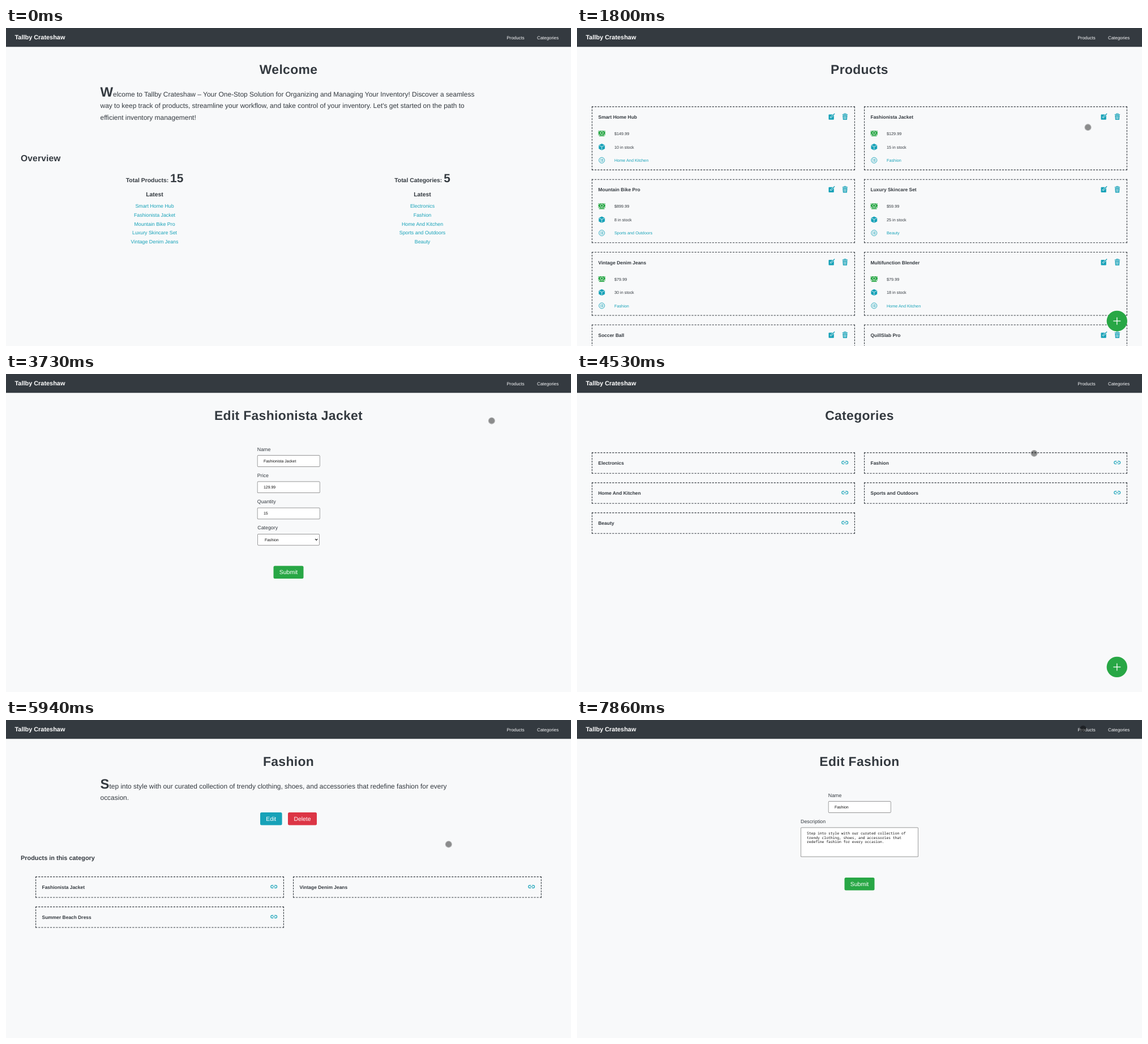
An HTML page with a canvas for the animation above (8 s loop, 998x561 px).

```html
<!DOCTYPE html>
<html lang="en">
<head>
<meta charset="utf-8">
<title>Inventory demo</title>
<style>
html, body { margin: 0; width: 100%; height: 100%; overflow: hidden; background: #f8f9fa; }
canvas { display: block; width: 998px; height: 561px; }
</style>
</head>
<body>
<canvas id="stage"></canvas>
<script>
const W = 998, H = 561, LOOP = 8000, FPS = 15;
const BG = '#f8f9fa', DARK = '#343a40', TEAL = '#17a2b8', GREEN = '#28a745', RED = '#dc3545';
const SANS = '"Liberation Sans", Arial, sans-serif';
const MONO = '"Noto Sans Mono", "DejaVu Sans Mono", monospace';
const BRAND = 'Tallby Crateshaw';
const LEFT = 26, MID = 507;

const canvas = document.getElementById('stage');
const ctx = canvas.getContext('2d');
const dpr = window.devicePixelRatio || 1;
canvas.width = W * dpr;
canvas.height = H * dpr;

// Text and shape helpers

function text(str, x, y, size, { color = DARK, bold = false, align = 'left', spacing = 0, font = SANS } = {}) {
  ctx.font = `${bold ? 'bold ' : ''}${size}px ${font}`;
  ctx.letterSpacing = spacing + 'px';
  ctx.textAlign = align;
  ctx.fillStyle = color;
  ctx.fillText(str, x, y);
  return ctx.measureText(str).width;
}

function fillBox(x, y, w, h, color, radius = 0) {
  ctx.fillStyle = color;
  ctx.beginPath();
  ctx.roundRect(x, y, w, h, radius);
  ctx.fill();
}

function disc(x, y, r, color) {
  ctx.fillStyle = color;
  ctx.beginPath();
  ctx.arc(x, y, r, 0, Math.PI * 2);
  ctx.fill();
}

function ring(x, y, r, color, width) {
  ctx.strokeStyle = color;
  ctx.lineWidth = width;
  ctx.beginPath();
  ctx.arc(x, y, r, 0, Math.PI * 2);
  ctx.stroke();
}

function line(color, width, ...pts) {
  ctx.strokeStyle = color;
  ctx.lineWidth = width;
  ctx.beginPath();
  for (let i = 0; i < pts.length; i += 2) ctx.lineTo(pts[i], pts[i + 1]);
  ctx.stroke();
}

function poly(color, ...pts) {
  ctx.fillStyle = color;
  ctx.beginPath();
  for (let i = 0; i < pts.length; i += 2) ctx.lineTo(pts[i], pts[i + 1]);
  ctx.fill();
}

// The gap is adjusted so that every side ends on a full dash
function dashedSide(x1, y1, x2, y2) {
  const len = Math.hypot(x2 - x1, y2 - y1), dash = 3.12, gap = 2.08;
  const gaps = Math.round((len - dash) / (dash + gap));
  ctx.setLineDash([dash, (len - dash * (gaps + 1)) / gaps]);
  line(DARK, 1.1, x1, y1, x2, y2);
  ctx.setLineDash([]);
}

function dashedBox(x, y, w, h) {
  const e = 0.6, r = x + w, b = y + h;
  dashedSide(x, y + e, r, y + e);
  dashedSide(x, b - e, r, b - e);
  dashedSide(x + e, y, x + e, b);
  dashedSide(r - e, y, r - e, b);
}

// Icons, each placed by its centre

function cashIcon(x, y) {
  fillBox(x - 6.2, y - 5, 12.4, 7.6, GREEN, 0.5);
  fillBox(x - 5.2, y + 3.2, 10.4, 1.6, GREEN, 0.6);
  ring(x, y - 1.2, 2.5, BG, 0.8);
  for (const dx of [-6.2, 6.2]) for (const dy of [-5, 2.6]) ring(x + dx, y + dy, 2, BG, 0.8);
}

function boxIcon(x, y) {
  poly(TEAL, x, y - 5.8, x + 5.4, y - 3.2, x + 5.4, y + 3, x, y + 5.8, x - 5.4, y + 3, x - 5.4, y - 3.2);
  line(BG, 0.8, x - 5.4, y - 3.1, x, y - 0.5, x + 5.4, y - 3.1);
  line(BG, 0.8, x, y - 0.5, x, y + 5.8);
}

function listIcon(x, y) {
  ring(x, y, 5, TEAL, 0.9);
  for (const dy of [-1.9, 0, 1.9]) {
    disc(x - 2.3, y + dy, 0.55, TEAL);
    line(TEAL, 0.8, x - 1, y + dy, x + 2.8, y + dy);
  }
}

function editIcon(x, y) {
  fillBox(x - 5, y - 4.2, 9.3, 9.3, TEAL, 1);
  line(BG, 2.6, x - 1.8, y + 1.6, x + 5.4, y - 5.6);
  line(TEAL, 1.4, x - 0.7, y + 0.5, x + 5.6, y - 5.8);
  poly(TEAL, x - 1.7, y + 1.5, x - 1.3, y, x - 0.2, y + 1.1);
}

function trashIcon(x, y) {
  fillBox(x - 4.8, y - 4.3, 9.6, 1.2, TEAL, 0.4);
  line(TEAL, 0.9, x - 1.8, y - 4, x - 1.8, y - 5.3, x + 1.8, y - 5.3, x + 1.8, y - 4);
  poly(TEAL, x - 4.1, y - 2.4, x + 4.1, y - 2.4, x + 3.5, y + 5.8, x - 3.5, y + 5.8);
  for (const dx of [-1.9, 0, 1.9]) line(BG, 0.75, x + dx, y - 1.2, x + dx * 0.85, y + 4.6);
}

function linkIcon(x, y) {
  ctx.strokeStyle = TEAL;
  ctx.lineWidth = 1.14;
  for (const side of [-1, 1]) {
    ctx.beginPath();
    ctx.moveTo(x + side, y - 2.4);
    ctx.lineTo(x + side * 3, y - 2.4);
    ctx.arc(x + side * 3, y, 2.4, -Math.PI / 2, Math.PI / 2, side < 0);
    ctx.lineTo(x + side, y + 2.4);
    ctx.stroke();
  }
  line(TEAL, 1.14, x - 2.4, y, x + 2.4, y);
}

// Page parts

function nav() {
  fillBox(0, 0, W, 33.3, DARK);
  text(BRAND, 15.5, 20.3, 10.92, { color: '#fff', bold: true });
  text('Products', 884.5, 19.6, 7.9, { color: BG });
  text('Categories', 938, 19.6, 7.9, { color: BG });
}

function tapped(x, w) {
  fillBox(x, 12, w, 10, 'rgba(30,150,180,.5)');
  ctx.strokeStyle = '#6f757b';
  ctx.lineWidth = 1;
  ctx.strokeRect(x - 0.5, 6.5, w + 0.5, 20.5);
}

function heading(str) {
  text(str, 499, 80.8, 22.88, { bold: true, align: 'center', spacing: 0.34 });
}

function intro(lines) {
  const cap = text(lines[0][0], 166.5, 120.5, 23.92, { bold: true });
  lines.forEach((s, i) => text(i ? s : s.slice(1), 166.5 + (i ? 0 : cap), 120.5 + i * 20.7, 11.96));
}

function button(str, x, y, w, color) {
  fillBox(x, y, w, 22.4, color, 2.5);
  text(str, x + w / 2, y + 14.8, 10.4, { color: '#fff', align: 'center' });
}

function addButton() {
  const x = 953.8, y = 516.9, arm = 6.5;
  disc(x, y, 18.2, GREEN);
  line('#fff', 1.3, x - arm, y, x + arm, y);
  line('#fff', 1.3, x, y - arm, x, y + arm);
}

function field(label, x, y, w, h) {
  text(label, x, y - 7.7, 8.84);
  fillBox(x, y, w, h, '#767676', 1.6);
  fillBox(x + 0.7, y + 0.7, w - 1.4, h - 1.4, '#fff', 1);
}

function input(label, value, y) {
  field(label, 443.8, y, 110.8, 20.4);
  text(value, 455, y + 12.6, 6.93, { color: '#111' });
}

function linkCard(name, x, y, w) {
  dashedBox(x, y, w, 37.6);
  text(name, x + 11.5, y + 21.7, 8.45, { bold: true });
  linkIcon(x + w - 17.8, y + 18);
}

function productCard([name, price, stock, category], x, y) {
  dashedBox(x, y, 465, 112.7);
  text(name, x + 11.5, y + 21.7, 8.45, { bold: true });
  editIcon(x + 423.5, y + 18.4);
  trashIcon(x + 447.4, y + 18);
  const ix = x + 17.8, tx = x + 40;
  cashIcon(ix, y + 48);
  boxIcon(ix, y + 71.6);
  listIcon(ix, y + 95);
  text('$' + price, tx, y + 50.7, 7.28);
  text(stock + ' in stock', tx, y + 74.2, 7.28);
  text(category, tx, y + 97.6, 7.28, { color: TEAL });
}

function summary(label, count, names, cx) {
  const bold = true;
  ctx.letterSpacing = '0px';
  ctx.font = `bold 10.4px ${SANS}`;
  const w = ctx.measureText(label + ' ').width;
  const x = cx - (w + String(count).length * 11.57) / 2;
  text(label, x, 272.2, 10.4, { bold });
  text(String(count), x + w, 272.2, 20.8, { bold });
  text('Latest', cx, 296.8, 10.4, { bold, align: 'center' });
  names.forEach((s, i) => text(s, cx, 317.4 + i * 15.6, 8.84, { color: TEAL, align: 'center' }));
}

// Data

const CATEGORIES = ['Electronics', 'Fashion', 'Home And Kitchen', 'Sports and Outdoors', 'Beauty'];
const [TECH, FASHION, HOME, SPORT, BEAUTY] = CATEGORIES;
const PRODUCTS = [
  ['Smart Home Hub', '149.99', 10, HOME],
  ['Fashionista Jacket', '129.99', 15, FASHION],
  ['Mountain Bike Pro', '899.99', 8, SPORT],
  ['Luxury Skincare Set', '59.99', 25, BEAUTY],
  ['Vintage Denim Jeans', '79.99', 30, FASHION],
  ['Multifunction Blender', '79.99', 18, HOME],
  ['Soccer Ball', '19.99', 40, SPORT],
  ['QuillSlab Pro', '999.99', 12, TECH]
];

// Pages

function homePage() {
  heading('Welcome');
  intro([
    `Welcome to ${BRAND} – Your One-Stop Solution for Organizing and Managing Your Inventory! Discover a seamless`,
    "way to keep track of products, streamline your workflow, and take control of your inventory. Let's get started on the path to",
    'efficient inventory management!'
  ]);
  text('Overview', LEFT, 234.5, 15.6, { bold: true, spacing: 0.15 });
  summary('Total Products:', 15, PRODUCTS.slice(0, 5).map(p => p[0]), 262.5);
  summary('Total Categories:', 5, CATEGORIES, 735.5);
}

function productsPage() {
  heading('Products');
  PRODUCTS.forEach((p, i) => productCard(p, i % 2 ? MID : LEFT, 138.3 + (i >> 1) * 128.3));
  addButton();
}

function editProductPage() {
  heading('Edit Fashionista Jacket');
  input('Name', 'Fashionista Jacket', 143.3);
  input('Price', '129.99', 189.5);
  input('Quantity', '15', 235.8);
  field('Category', 444.3, 282, 109.4, 20.4);
  text(FASHION, 457, 294.6, 6.93, { color: '#111' });
  line('#111', 1.1, 546.1, 290.9, 548.2, 293.1, 550.3, 290.9);
  button('Submit', 472.5, 338.6, 53, GREEN);
}

function categoriesPage() {
  heading('Categories');
  CATEGORIES.forEach((c, i) => linkCard(c, i % 2 ? MID : LEFT, 138.3 + (i >> 1) * 53, 465));
  addButton();
}

function fashionPage() {
  heading(FASHION);
  intro([
    'Step into style with our curated collection of trendy clothing, shoes, and accessories that redefine fashion for every',
    'occasion.'
  ]);
  button('Edit', 449, 163, 38.6, TEAL);
  button('Delete', 498, 163, 51, RED);
  text('Products in this category', LEFT, 247.3, 10.92, { bold: true });
  linkCard('Fashionista Jacket', 52, 276, 439);
  linkCard('Vintage Denim Jeans', MID, 276, 439);
  linkCard('Summer Beach Dress', 52, 329, 439);
}

function editCategoryPage() {
  heading('Edit Fashion');
  input('Name', FASHION, 143.3);
  field('Description', 395, 189.5, 208, 52);
  ['Step into style with our curated collection of', 'trendy clothing, shoes, and accessories that', 'redefine fashion for every occasion.']
    .forEach((s, i) => text(s, 406, 201.6 + i * 7.9, 6.34, { color: '#111', font: MONO }));
  button('Submit', 472.5, 278, 53, GREEN);
}

const TIMELINE = [
  [0, homePage], [1060, productsPage], [2460, editProductPage],
  [4260, categoriesPage], [5795, fashionPage], [6730, editCategoryPage]
];

// Pointer path: time, x, y
const PATH = [
  [120, 969, 467], [800, 894, 20], [930, 894, 20], [1130, 890, 24], [1450, 800, 150],
  [1730, 762, 207], [1800, 902.5, 175.2], [2000, 925, 163], [2260, 933, 158], [2400, 933, 158],
  [2733, 918, 179], [3200, 502, 357], [3950, 948, 13], [4130, 948, 13], [4533, 807.6, 140],
  [4920, 644, 174], [5400, 958, 154], [5740, 880, 172], [5933, 782, 219.3], [6450, 466, 178],
  [6700, 466, 178], [7460, 856, 112], [7600, 966, 60], [7860, 894, 15.5]
];

const rate = (i, k) => (PATH[i + 1][k] - PATH[i][k]) / (PATH[i + 1][0] - PATH[i][0]);

// Monotone slope, so the path never overshoots its points
function slope(i, k) {
  if (i === 0 || i === PATH.length - 1) return 0;
  const a = rate(i - 1, k), b = rate(i, k);
  return a * b <= 0 ? 0 : 2 * a * b / (a + b);
}

function pathAt(t, k) {
  const n = PATH.findIndex(p => p[0] > t);
  if (n < 0) return PATH[PATH.length - 1][k];
  if (n === 0) return PATH[0][k];
  const a = PATH[n - 1], b = PATH[n], d = b[0] - a[0], u = (t - a[0]) / d, v = 1 - u;
  return v * v * (1 + 2 * u) * a[k] + u * u * (3 - 2 * u) * b[k]
    + d * u * v * (v * slope(n - 1, k) - u * slope(n, k));
}

function pointer(t) {
  const x = pathAt(t, 1), y = pathAt(t, 2);
  disc(x, y, 5, 'rgba(0,0,0,.44)');
  ring(x, y, 5.5, 'rgba(0,0,0,.27)', 1.2);
}

function draw(now) {
  // The screen refreshes 15 times a second
  const t = Math.floor((now % LOOP + 13.4) * FPS / 1000) * 1000 / FPS;
  ctx.setTransform(dpr, 0, 0, dpr, 0, 0);
  ctx.textRendering = 'geometricPrecision';
  fillBox(0, 0, W, H, BG);
  TIMELINE.filter(([start]) => start <= t).pop()[1]();
  nav();
  if (t >= 925 && t < 1060) tapped(879, 42);
  if (t >= 4125 && t < 4260) tapped(932.5, 50);
  if (t >= 120) pointer(t);
}

const start = performance.now();
function tick() {
  draw(performance.now() - start);
  requestAnimationFrame(tick);
}
tick();
</script>
</body>
</html>
```
